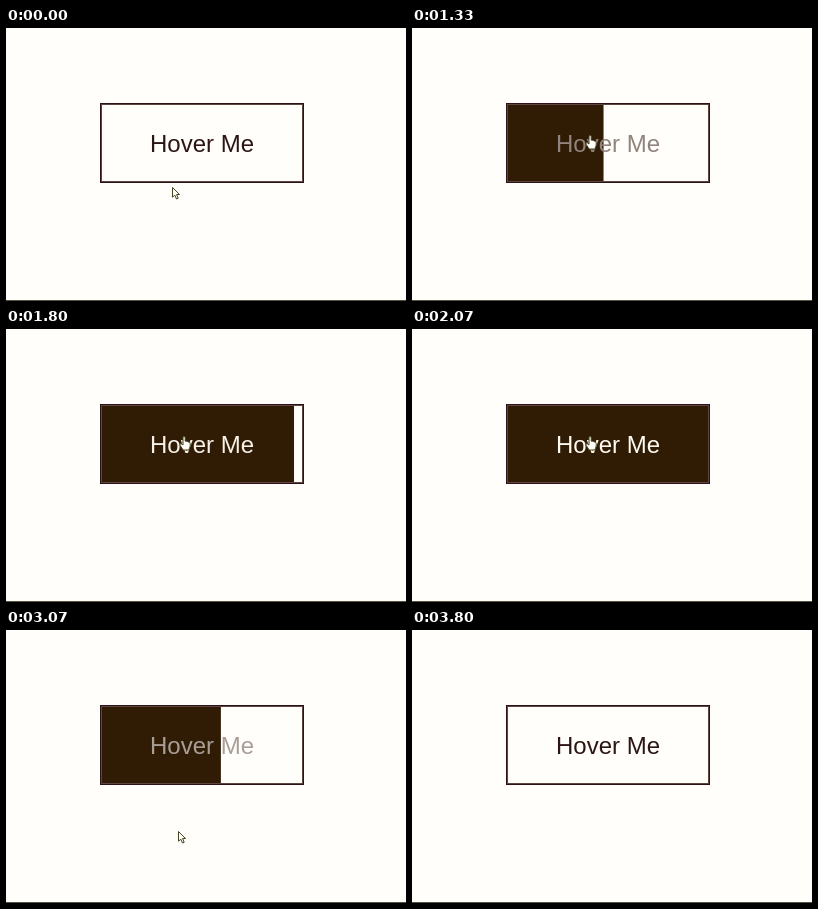
Write an HTML page that moves like this. It is 400 by 273 pixels and loops after 3.94 s.

```html
<!DOCTYPE html>
<html lang="en">
<head>
<meta charset="utf-8">
<title>Hover button</title>
<style>
  html, body { margin: 0; width: 100%; height: 100%; overflow: hidden; background: #fffefa; }
  svg { display: block; width: 400px; height: 273px; }
  text { font: 24px "Liberation Sans", Arial, sans-serif; }
  .cursor { fill: #fffefa; stroke: #45421f; stroke-width: 1; stroke-linejoin: round; }
</style>
</head>
<body>
<svg viewBox="0 0 400 273">
  <rect y="272" width="400" height="1" fill="#55533f"/>
  <rect id="fill" x="96" y="77" height="76" fill="#301c05"/>
  <g fill="none">
    <rect x="95.5" y="76.5" width="201" height="77" stroke="#5b4642"/>
    <rect x="94.5" y="75.5" width="203" height="79" stroke="#2c1216"/>
  </g>
  <text id="label" x="196" y="123.5" text-anchor="middle">Hover Me</text>
  <g id="cursor" class="cursor">
    <path id="arrow" d="M.5 .5V10.2L2.8 8.2L4.5 12L6.2 11.3L4.6 7.5H7.6Z"/>
    <path id="hand" d="M0 1.3Q1-.6 2.2 1.3V5.2Q3.2 4.4 4 5.6Q5 5 5.7 6.2Q7 5.8 7.2 7.3V10.2L5.8 14H.2L-3 9.2Q-3.6 7.6-2 7.6L0 9Z"/>
  </g>
</svg>
<script>
  const LOOP = 3940, TICK = 1000 / 15, FADE = 1000;
  const ENTER = 1051, LEAVE = 2818, GONE = 3390;
  const DARK = [44, 22, 20], LIGHT = [255, 250, 240];

  // each glide carries the pointer tip to a new resting place
  const home = { x: 166, y: 159 };
  const glides = [
    { from: 70, to: 330, x: 168, y: 160 },
    { from: 933, to: 1330, x: 177, y: 107 },
    { from: 2667, to: 3100, x: 172, y: 203 },
    { from: 3133, to: 3390, x: 378, y: 204 }
  ];
  const [fill, label, cursor, arrow, hand] =
    ["fill", "label", "cursor", "arrow", "hand"].map(id => document.getElementById(id));

  const mix = (a, b, u) => a + (b - a) * u;
  const clamp = u => Math.min(1, Math.max(0, u));
  const smooth = u => u * u * (3 - 2 * u);
  const bezier = (a, b, s) => 3 * a * s * (1 - s) ** 2 + 3 * b * s * s * (1 - s) + s ** 3;

  // the CSS "ease" curve
  function ease(x) {
    if (x <= 0) return 0;
    if (x >= 1) return 1;
    let lo = 0, hi = 1;
    for (let i = 0; i < 24; i++) {
      const mid = (lo + hi) / 2;
      if (bezier(.25, .25, mid) < x) lo = mid; else hi = mid;
    }
    return bezier(.1, 1, lo);
  }

  function tipAt(t) {
    return glides.reduce((tip, g) => {
      const u = smooth(clamp((t - g.from) / (g.to - g.from)));
      return { x: mix(tip.x, g.x, u), y: mix(tip.y, g.y, u) };
    }, home);
  }

  function draw(t) {
    const cover = ease((t - ENTER) / FADE) - ease((t - LEAVE) / FADE);
    fill.setAttribute("width", 200 * cover);
    label.setAttribute("fill", `rgb(${DARK.map((c, i) => Math.round(mix(c, LIGHT[i], cover)))})`);

    const over = t > ENTER && t < LEAVE;
    const { x, y } = tipAt(t);
    cursor.setAttribute("transform", `translate(${Math.round(x)} ${Math.round(y)})`);
    cursor.style.display = t < GONE ? "" : "none";
    arrow.style.display = over ? "none" : "";
    hand.style.display = over ? "" : "none";
  }

  const start = performance.now();
  function frame() {
    const t = (performance.now() - start) % LOOP;
    draw(Math.floor((t + 4) / TICK) * TICK);
    requestAnimationFrame(frame);
  }
  frame();
</script>
</body>
</html>
```
